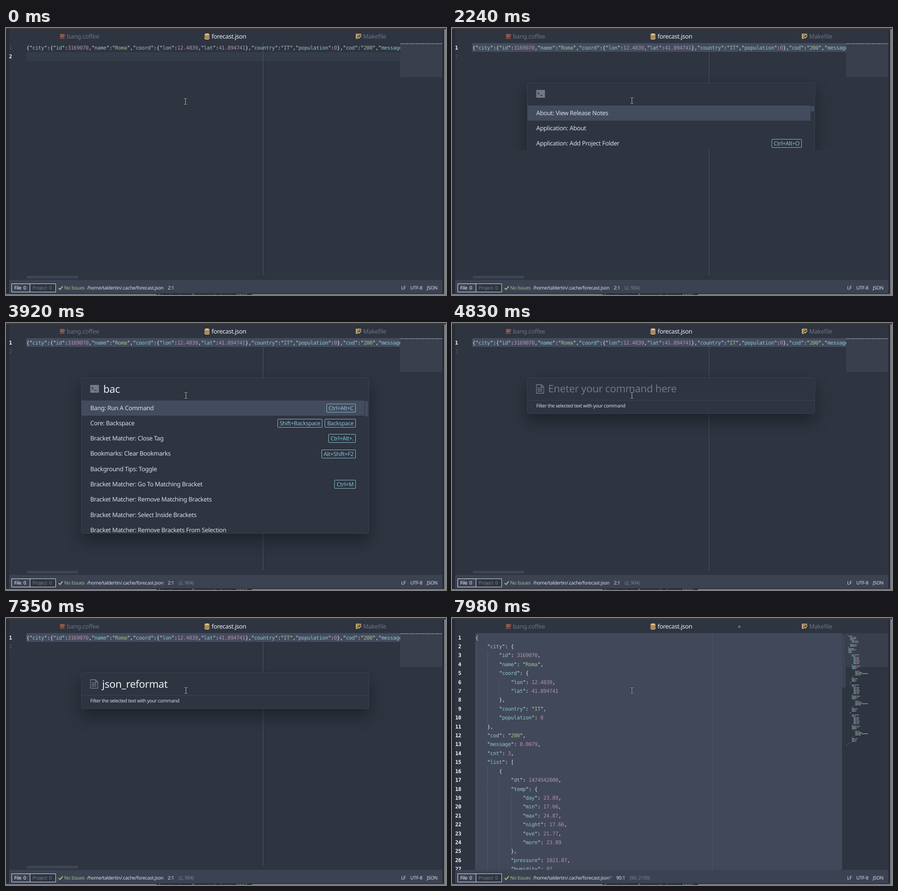
An HTML page for the animation above (8 s loop, 961x582 px).

```html
<!DOCTYPE html>
<html lang="en">
<head>
<meta charset="utf-8">
<title>Editor: filter a selection</title>
<style>
  html, body { margin: 0; width: 100%; height: 100%; overflow: hidden; background: #2e3440; }
  body { position: relative; width: 961px; height: 582px; color: #d8dee9;
    font: 13.3px "Noto Sans", "Open Sans", sans-serif; letter-spacing: -.025em;
    text-rendering: geometricPrecision; }
  [hidden] { display: none !important; }
  body > *, #panel > *, #palette > *, #dialog > * { position: absolute; }
  svg { left: 0; top: 0; }
  .status { font-size: 10.4px; }

  .editor { left: 0; top: 33px; width: 861px; height: 515.5px; overflow: hidden; }
  .editor * { letter-spacing: -.4px; }
  .editor > * { position: absolute; top: 0; margin: 0; }
  pre { font: 11.4px/19.4px "DejaVu Sans Mono", "Noto Sans Mono", monospace; }
  .editor > pre { top: .6px; }
  .code { color: #dfe5ee; }
  .code i { display: inline-block; height: 19.4px; vertical-align: top; box-shadow: inset 1px 0 #4d586c; }
  .gutter { left: 0; text-align: right; font-weight: bold; color: #f4f6fa; }
  .gutter .dim { font-weight: normal; color: #4c566a; }
  .key { color: #8fc4c4; } .string { color: #a3be8c; } .number { color: #b48ead; }
  .ruler { width: 1px; background: #4c5466; }

  #panel { left: 0; top: 0; width: 961px; height: 582px; }
  .box { left: 164px; top: 119px; width: 627px; border: 1px solid #3b4252; border-radius: 4px;
    background: #2e3440; box-shadow: 0 17px 32px rgba(0, 0, 0, .34); }
  .input { top: 129px; height: 30px; font-size: 22.4px; line-height: 30px; white-space: pre; color: #eceff4; }
  .caret { display: inline-block; width: 2px; height: 30px; vertical-align: top; background: #eceff4; }
  .hint { left: 210px; color: #6f7684; top: 128px; }
  .rows { left: 165px; top: 168.6px; width: 618px; height: 289px; overflow: hidden; }
  .row { display: flex; height: 33.3px; line-height: 33.3px; padding: 0 19px; align-items: center; }
  .row:first-child { background: #434c5e; }
  .row span { flex: 1; }
  kbd { margin-left: 5px; padding: 0 4px; border: 1px solid #88c0d0; border-radius: 2px; color: #88c0d0;
    font: 12.3px/17px "Noto Sans", "Open Sans", sans-serif; }
  .thumb { left: 784px; top: 170px; width: 7px; border-radius: 2px; background: #434b5c; }
  #mouse { overflow: visible; }
</style>
</head>
<body>
<svg width="961" height="582">
  <path fill="#272c36" d="M0 3h7v579H0zM953 3h4v579h-4z"/>
  <path fill="#3a3a38" d="M0 0h961v3.500H0z"/>
  <path fill="#3b4252" d="M7 549h946v29H7z"/>
  <path fill="#2b303b" d="M0 578h961v4H0z"/>
  <text x="329" y="588" fill="#7f9a6c" font-size="12" font-family="Noto Sans Mono, monospace">drwxr-xr-x forecast.json 4096</text>
  <path fill="#7c7f84" d="M957 3h4v579h-4zM0 580h329v2H0zM537 580h424v2H537z"/>

  <g fill="#8a5a48">
    <path d="M118 13h9v6q0 2-2 2h-5q-2 0-2-2zM116.500 22h12v1.500h-12z"/>
    <path d="M126 14.500h2.500v3.500H126" fill="none" stroke="#8a5a48" stroke-width="1.200"/>
  </g>
  <text x="133" y="23" fill="#6c7382">bang.coffee</text>
  <g fill="#ebbf78">
    <ellipse cx="439" cy="14" rx="5.500" ry="2.200"/>
    <path id="disc" d="M433.500 15.500q5.500 3 11 0v2q-5.500 3-11 0z"/>
    <use href="#disc" y="3.200"/><use href="#disc" y="6.300"/>
  </g>
  <text x="449" y="23" fill="#eceff4">forecast.json</text>
  <path d="M764 13.500h10.500v3M764 16.500h8M764 19.500h4M765 13v9.500h4M769 19.500l2.500 2.500 4.500-5" fill="none" stroke="#d8b274" stroke-width="1.800"/>
  <text x="780" y="23" fill="#6c7382">Makefile</text>
  <circle id="modified" cx="627.500" cy="19" r="2" fill="none" stroke="#88c0d0"/>

  <g class="status" fill="#d8dee9">
    <path d="M52.500 557.500h56v18h-56z" fill="#2e3440" stroke="#d8dee9"/>
    <path d="M12.500 557.500h40v18h-40z" fill="none" stroke="#e5e9f0"/>
    <text x="18" y="570" fill="#f4f6fa">File&#160; 0</text>
    <text x="58" y="570" fill="#727a8a">Project&#160; 0</text>
    <path d="M115 567l3 3 6-7" fill="none" stroke="#a3be8c" stroke-width="2"/>
    <text x="127" y="570" fill="#a3be8c">No Issues</text>
    <text x="177" y="570">/home/taldertin/.cache/forecast.json<tspan id="star" fill="#88909f"></tspan><tspan id="position" dx="9.500"></tspan><tspan id="selection" dx="10" fill="#7b8392"></tspan></text>
    <text x="863" y="570">LF</text><text x="883" y="570">UTF-8</text><text x="919" y="570">JSON</text>
  </g>
</svg>

<div class="editor" id="before">
  <div id="activeLine" style="left:44px;width:817px;height:19px"></div>
  <div class="ruler" style="left:561px;height:506px"></div>
  <pre class="gutter" id="gutterBefore" style="width:13px"></pre>
  <pre class="code" id="minified" style="left:44.5px"></pre>
  <div id="lineCaret" style="left:44px;top:20px;width:2px;height:19px;background:#d8dee9"></div>
  <div style="left:45px;top:507px;width:113px;height:6px;border-radius:3px;background:#3d4454"></div>
</div>
<div class="editor" id="after">
  <div style="left:51px;width:801px;height:516px;background:#414859"></div>
  <div class="ruler" style="left:568px;height:516px"></div>
  <pre class="gutter" id="gutterAfter" style="width:20px"></pre>
  <pre class="code" id="formatted" style="left:51px"></pre>
  <div style="left:852px;top:2px;width:8px;height:117px;border-radius:3px;background:#3c4353"></div>
</div>
<svg width="961" height="582">
  <path fill="#393f4c" d="M861 33h92v74h-92z"/>
  <path id="mapBefore" d="M861 34.200h92" stroke="#a9b2b8" stroke-dasharray="7 .6 3 .6"/>
  <g id="mapAfter" opacity=".9"></g>
</svg>

<div id="panel">
  <div class="box" id="box"></div>
  <div id="palette">
    <svg width="210" height="160">
      <path fill="#727987" d="M184 135h19v17h-19z"/>
      <path d="M187 139.500l3.500 3-3.500 3M192 147h6" fill="none" stroke="#2e3440" stroke-width="1.500"/>
    </svg>
    <div class="rows" id="rows"></div>
    <div class="thumb" id="thumb"></div>
  </div>
  <div id="dialog">
    <svg width="800" height="200">
      <path d="M184.500 134.500h11l5 5v13.500h-16zM195.500 134.500v5h5M187 141.500h10M187 145h10M187 148.500h10" fill="none" stroke="#79808e" stroke-width="1.300"/>
      <path d="M165 168.500h627" stroke="#3b4252"/>
      <text x="184" y="184" class="status" fill="#d8dee9">Filter the selected text with your command</text>
    </svg>
  </div>
  <div class="input hint" id="hint">Eneter your command here</div>
  <div class="input" id="input"><span id="typed"></span><i class="caret" id="caret"></i></div>
</div>
<svg id="mouse" width="961" height="582" fill="none">
  <defs><path id="beam" d="M-3-6.500h2l1 1 1-1h2M0-5.500v11M-3 6.500h2l1-1 1 1h2"/></defs>
  <use href="#beam" stroke="#14171c" stroke-width="3"/>
  <use href="#beam" stroke="#f4f4f4"/>
</svg>

<script>
const el = Object.fromEntries([...document.querySelectorAll('[id]')].map(e => [e.id, e]));
const show = (name, on) => el[name].toggleAttribute('hidden', !on);
const setText = (name, s) => { if (el[name].textContent !== s) el[name].textContent = s; };

const day = (dt, warm, cool, main, description, icon) => ({
  dt,
  temp: { day: warm, min: cool, max: +(warm + .98).toFixed(2), night: cool, eve: 21.77, morn: warm },
  pressure: 1021.07, humidity: 92,
  weather: [{ id: 800, main, description, icon }],
  speed: 1.36, deg: 254, clouds: 0
});
const forecast = {
  city: { id: 3169070, name: 'Roma', coord: { lon: 12.4839, lat: 41.894741 }, country: 'IT', population: 0 },
  cod: '200', message: .0079, cnt: 3,
  list: [
    day(1474542000, 23.89, 17.66, 'Clear', 'sky is clear', '01d'),
    day(1474628400, 24.31, 16.92, 'Clear', 'sky is clear', '02d'),
    day(1474714800, 25.12, 17.05, 'Clear', 'sky is clear', '01d')
  ]
};
const TOKEN = /"[^"]*"|[\d.]+|[^\s]/g;
const kind = (token, next) => token[0] === '"' ? (next === ':' ? 'key' : 'string') : /\d/.test(token) ? 'number' : '';
const highlight = line => line
  .replace(TOKEN, (s, i) => {
    const type = kind(s, line[i + s.length]);
    return !type ? s : s[0] === '"'
      ? `"<span class="${type}">${s.slice(1, -1)}</span>"`
      : `<span class="${type}">${s}</span>`;
  })
  .replace(/^ +/, s => '<i>    </i>'.repeat(s.length / 4));

const lines = JSON.stringify(forecast, null, 4).split('\n');
el.minified.innerHTML = highlight(JSON.stringify(forecast));
el.formatted.innerHTML = lines.slice(0, 27).map(highlight).join('\n');
el.gutterAfter.textContent = lines.slice(0, 27).map((_, i) => i + 1).join('\n');

const mapColors = { key: '#8fbcbb', string: '#a3be8c', number: '#b48ead', '': '#aab2bf' };
el.mapAfter.innerHTML = lines.map((line, row) => [...line.matchAll(TOKEN)].map(({ 0: s, index }) =>
  `<rect x="${862 + index * .93}" y="${36 + row * 2.73}" width="${s.length * .93}" height="1.300" fill="${mapColors[kind(s, line[index + s.length])]}"/>`
).join('')).join('');

const lists = [
  ['About: View Release Notes', 'Application: About', 'Application: Add Project Folder|Ctrl+Alt+O',
    'Application: Inspect', 'Application: New File|Ctrl+N', 'Application: New Window|Ctrl+Shift+N',
    'Application: Open', 'Application: Open Dev', 'Application: Open File|Ctrl+O'],
  ['Bang: Edit Text|Ctrl+Alt+E', 'Core: Backspace|Shift+Backspace|Backspace', 'Bookmarks: View All|Ctrl+F2',
    'Bang: Run A Command|Ctrl+Alt+C', 'Status Bar: Toggle', 'Emmet: Balance Inward|Ctrl+Shift+0',
    'Bookmarks: Toggle Bookmark|Ctrl+Shift+F2', 'Bracket Matcher: Close Tag|Ctrl+Alt+.',
    'Bookmarks: Clear Bookmarks|Alt+Shift+F2'],
  ['Bang: Run A Command|Ctrl+Alt+C', 'Core: Backspace|Shift+Backspace|Backspace',
    'Bracket Matcher: Close Tag|Ctrl+Alt+.', 'Bookmarks: Clear Bookmarks|Alt+Shift+F2',
    'Background Tips: Toggle', 'Bracket Matcher: Go To Matching Bracket|Ctrl+M',
    'Bracket Matcher: Remove Matching Brackets', 'Bracket Matcher: Select Inside Brackets',
    'Bracket Matcher: Remove Brackets From Selection']
].map(list => list.map(item => {
  const [name, ...keys] = item.split('|');
  return `<div class="row"><span>${name}</span>${keys.map(k => `<kbd>${k}</kbd>`).join('')}</div>`;
}).join(''));
const thumbHeights = [12, 23, 34];

// Each step is [start time, value]; the last one reached applies.
const at = (steps, t) => steps.filter(([start]) => t >= start).pop()[1];
const typing = [[0, ''], [3080, 'b'], [3220, 'ba'], [3360, 'bac'], [4760, ''],
  [6230, 'j'], [6440, 'js'], [6790, 'json_reformat']];
const listSteps = [[0, 0], [3220, 1], [3430, 2]];
const caretSteps = [[0, 0], [2590, 1], [3010, 0], [3080, 1], [3920, 0], [4340, 1], [4760, 0],
  [5110, 1], [5530, 0], [5950, 1], [7350, 0]];
const mouseSteps = [[0, '392 160'], [350, '392 159'], [560, '392 158'], [770, '393 158']];

let shownList, shownActive;
function frame() {
  const t = performance.now() % 8000;
  const selected = t >= 1050, inDialog = t >= 4760, done = t >= 7630;

  show('before', !done); show('after', done);
  show('mapBefore', !done); show('mapAfter', done);
  const active = selected ? 1 : 2;
  if (active !== shownActive) {
    shownActive = active;
    el.gutterBefore.innerHTML = [1, 2].map(n => `<span class="${n === active ? '' : 'dim'}">${n}</span>`).join('\n');
  }
  el.activeLine.style.top = selected ? '0' : '20px';
  el.activeLine.style.background = selected ? '#434c5e' : '#353c49';
  show('lineCaret', t >= 210 && t < 630);

  show('modified', t >= 7910);
  setText('star', t >= 7910 ? '*' : '');
  setText('position', t >= 7700 ? '90:1' : '2:1');
  setText('selection', t >= 7700 ? '(90, 2190)' : t >= 1120 ? '(2, 904)' : '');

  show('panel', t >= 2240 && !done);
  el.panel.style.clipPath = t < 2310 ? 'inset(0 0 316px 0)' : 'none';
  show('palette', !inDialog); show('dialog', inDialog);
  el.box.style.height = inDialog ? '77px' : '338px';
  const list = at(listSteps, t);
  if (list !== shownList) {
    shownList = list;
    el.rows.innerHTML = lists[list];
    el.thumb.style.height = thumbHeights[list] + 'px';
  }
  setText('typed', at(typing, t));
  el.input.style.left = inDialog ? '210px' : '212.5px';
  show('caret', at(caretSteps, t));
  show('hint', inDialog && t < 6230);

  const [x, y] = at(mouseSteps, t).split(' ');
  el.mouse.style.transform = `translate(${x}px, ${y}px)`;
  requestAnimationFrame(frame);
}
frame();
</script>
</body>
</html>
```
